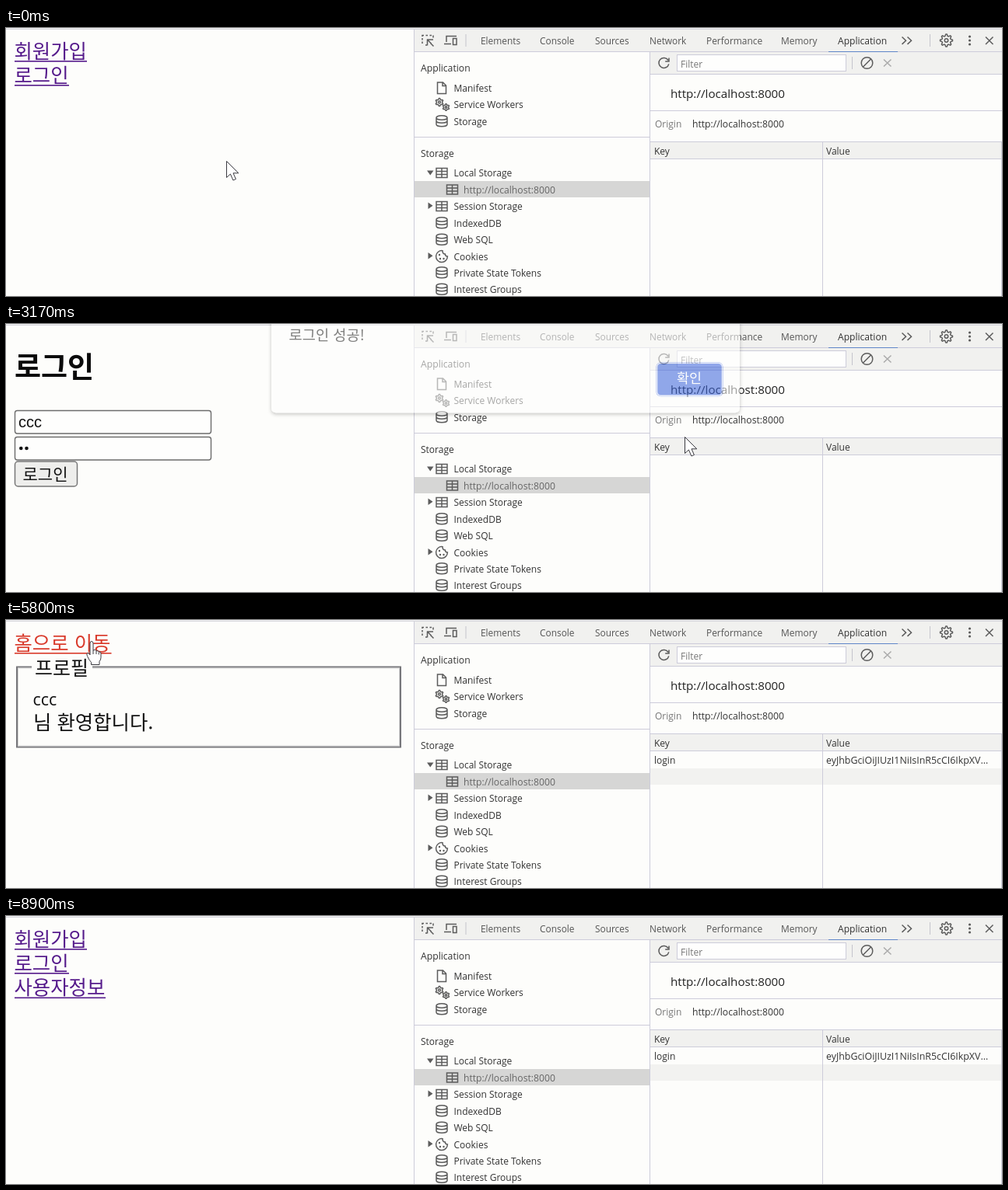
An HTML page that plays this animation: 1280x345 px, repeating every 8930 ms.

```html
<!DOCTYPE html>
<html lang="ko">
<head>
<meta charset="utf-8">
<title>Login demo</title>
<style>
  html, body { margin: 0; width: 100%; height: 100%; overflow: hidden; background: #fdfdfb; }
  svg { display: block; width: 1280px; height: 345px; }
  text { white-space: pre; }
  .ui { font-family: "Open Sans", "Noto Sans", sans-serif; }
  .ko { font-family: "Noto Sans CJK KR", "Noto Sans CJK", "Noto Sans KR", sans-serif; }
  .field { font-family: "Liberation Sans", sans-serif; }
  .icon { fill: none; stroke: #5c5c5c; stroke-width: 1.5; }
</style>
</head>
<body>
<svg id="stage" viewBox="0 0 1280 345" xmlns="http://www.w3.org/2000/svg"></svg>
<script>
const LOOP = 8930;
const INK = '#333', GREY = '#5c5c5c', LINE = '#cdccda', BAR = '#f1f1ef', PAPER = '#fdfdfb';
const VISITED = '#551a8b', ACTIVE = '#d93a2b', BLUE = '#3f67dc';
const stage = document.getElementById('stage');

// Markup helpers
const rect = (x, y, w, h, fill, extra = '') =>
  `<rect x="${x}" y="${y}" width="${w}" height="${h}" fill="${fill}" ${extra}/>`;
const text = (x, y, str, size = 12, fill = INK, cls = 'ui', extra = '') =>
  `<text x="${x}" y="${y}" class="${cls}" font-size="${size}" fill="${fill}" ${extra}>${str}</text>`;
const ko = (x, y, str, size = 25.4, fill = '#111', extra = 'font-weight="300"') =>
  text(x, y, str, size, fill, 'ko', extra);
const icon = (d, extra = '') => `<path class="icon" d="${d}" ${extra}/>`;
const group = (id, body, extra = '') => `<g id="${id}" ${extra}>${body}</g>`;
const hline = (x, y, w) => rect(x, y, w, 1, LINE);
const vline = (x, y, h) => rect(x, y, 1, h, LINE);

const gear = (cx, cy, r, teeth) => {
  let d = '';
  for (let i = 0; i < teeth * 4; i++) {
    const a = (i - .5) / (teeth * 4) * Math.PI * 2;
    const q = i % 4 < 2 ? r : r * .72;
    d += (i ? 'L' : 'M') + (cx + q * Math.sin(a)).toFixed(2) + ' ' + (cy - q * Math.cos(a)).toFixed(2);
  }
  return icon(d + 'Z', 'stroke-linejoin="round"') +
    `<circle cx="${cx}" cy="${cy}" r="${r * .28}" class="icon"/>`;
};
const database = (x, y) =>
  icon(`M${x - 7} ${y - 4.5}a7 2.8 0 0 1 14 0a7 2.8 0 0 1 -14 0v8.4a7 2.8 0 0 0 14 0v-8.4M${x - 7} ${y - .5}a7 2.8 0 0 0 14 0`);
const grid = (x, y) =>
  icon(`M${x - 7} ${y - 6}h14v12h-14zM${x - 7} ${y - 2}h14M${x - 7} ${y + 2}h14M${x} ${y - 6}v12`);
const cookie = (x, y) =>
  icon(`M${x + 1} ${y - 7.3}a7.4 7.4 0 1 0 6.4 7.3q-3 0 -3 -3q-3.4 0 -3.4 -4.3z`) +
  [[-3, -2], [-2, 3], [2.5, 3]].map(([a, b]) => `<circle cx="${x + a}" cy="${y + b}" r="1.2" fill="${GREY}"/>`).join('');
const file = (x, y) => icon(`M${x - 5.5} ${y - 7}h7l4 4v10.5h-11zM${x + 1} ${y - 7}v4.5h4.5`);
const workers = (x, y) => gear(x - 3, y - 3, 5, 6) + gear(x + 5.5, y + 3.5, 4.3, 6);
const twisty = (y, open) => open
  ? `<path d="M541 ${y - 3}h8.500l-4.250 6z" fill="${GREY}"/>`
  : `<path d="M542.500 ${y - 5}v8.500l6 -4.250z" fill="${GREY}"/>`;

function devtools() {
  const url = 'http://localhost:8000';
  const tabs = [[610, 'Elements'], [686, 'Console'], [757, 'Sources'], [827, 'Network'],
    [900, 'Performance'], [996, 'Memory']];
  const rows = [[77, 'Manifest', file], [98.5, 'Service Workers', workers], [120, 'Storage', database],
    [186.5, 'Local Storage', grid], [229.5, 'Session Storage', grid], [251, 'IndexedDB', database],
    [272.5, 'Web SQL', database], [294, 'Cookies', cookie], [315, 'Private State Tokens', database],
    [336.5, 'Interest Groups', database]];
  return rect(524, 2, 756, 343, PAPER) + rect(524, 2, 756, 28, BAR) + hline(524, 30, 756) +
    // tab strip
    icon('M541 22h-2M535 20v-2.500M535 15.500v-2.500M535 11v-1.500h2M539.500 9.500h2.500M544.500 9.500h2.500M549 9.500v3') +
    icon('M549.500 23.500l-4 -4M541 15h8M541.500 14.500v8M541.500 15l5 5') +
    icon('M566 18v-7.500h13M563 20.500h9M574.500 13.500h4.500v8h-4.500z') +
    rect(590.5, 8, 1, 16, '#c4c4cc') +
    tabs.map(([x, s]) => text(x, 20.5, s, 11.9, '#555')).join('') +
    text(1069, 20.5, 'Application', 12.1) + rect(1057, 30, 89, 1.2, '#5f86c8') +
    icon('M1151.500 11.500l5 4.700l-5 4.700M1158.500 11.500l5 4.700l-5 4.700') +
    rect(1187, 8, 1, 16, '#c4c4cc') + gear(1208.5, 16, 8, 8) +
    [11, 16, 21].map(y => `<circle cx="1238.500" cy="${y}" r="1.600" fill="${GREY}"/>`).join('') +
    icon('M1259 11.500l9.500 9.500M1268.500 11.500l-9.500 9.500') +
    // sidebar
    text(533, 55.5, 'Application', 12.2) + hline(524, 140, 303) + text(533, 165.5, 'Storage') +
    rect(524, 197, 303, 21, '#d6d6d5') + grid(573.5, 208) + text(588, 212.5, url, 12.2, '#666') +
    rows.map(([y, s, paint]) => paint(560, y) + text(575.5, y + 4.5, s)).join('') +
    twisty(186.5, true) + twisty(229.5, false) + twisty(294, false) +
    // main view
    rect(828, 31, 452, 28, BAR) + hline(828, 59, 452) +
    icon('M851 41.500a6.500 6.500 0 1 0 .8 4.800M852 38.500v4.500h-4.800') +
    rect(862.5, 34.5, 217, 21, '#fefefd', `stroke="${LINE}"`) + text(867, 50.5, 'Filter', 12, '#777') +
    rect(1087, 37, 1, 16, '#c4c4cc') +
    icon('M1113.800 45a7.300 7.300 0 1 0 -14.600 0a7.300 7.300 0 1 0 14.600 0M1111.500 40l-10 10') +
    icon('M1128 40.500l9.500 9M1137.500 40.500l-9.500 9', 'style="stroke:#aaa"') +
    text(854, 89.5, url, 15.2, '#222') + hline(828, 106, 452) +
    text(834, 127.5, 'Origin', 12, '#777') + text(882, 127.5, url, 12.2) +
    rect(828, 147, 452, 21, BAR) + hline(828, 146, 452) + hline(828, 168, 452) +
    text(833, 162.5, 'Key') + text(1054, 162.5, 'Value') +
    group('entry', rect(828, 191, 452, 21, '#f2f2f0') + text(833, 185, 'login') +
      text(1054, 185, 'eyJhbGciOiJIUzI1NiIsInR5cCI6IkpXV…', 12.4)) +
    vline(1049, 146, 199) + vline(827, 31, 314) + vline(524, 2, 343) + vline(1279, 146, 199);
}

const link = (id, y, str, w) =>
  group(id, ko(10.5, y, str, 25.4, 'currentColor') + rect(11, y + 3.5, w, 1.6, 'currentColor'));

const home = () => link('join', 38.5, '회원가입', 93) + link('signin', 69.5, '로그인', 70) +
  link('info', 101, '사용자정보', 117);

function login() {
  const box = (id, y) => rect(11.5, y, 252, 29.5, '#fefefd', `id="${id}" rx="3"`);
  const items = ['ccc', 'cnrcnr', 'cnrcn', 'cc'];
  return ko(11, 69, '로그인', 37, '#0b0b0b', 'font-weight="700"') +
    box('userBox', 111.5) + box('passBox', 145.5) +
    ko(16.5, 133, '아이디', 20.9, '#757575', 'id="userHint" font-weight="300"') +
    ko(16.5, 167, '비밀번호', 20.9, '#757575', 'id="passHint" font-weight="300"') +
    text(16, 133, '', 20, '#111', 'field', 'id="user"') +
    rect(0, 116, 1.4, 20, '#111', 'id="caret"') +
    [0, 1].map(i => `<circle id="dot${i}" cx="${19.3 + i * 7.2}" cy="160" r="2.300" fill="#111"/>`).join('') +
    rect(11.5, 177, 80, 32, '#eeeeec', 'rx="4" stroke="#777" stroke-width="1.500"') +
    ko(21.5, 200.5, '로그인', 21) +
    group('suggest',
      `<path d="M112 154h16l10 -9.500l10 9.500h167q4 0 4 4v200h-210v-201q0 -3 3 -3z" fill="#fefefd" filter="url(#soft)"/>` +
      items.map((s, i) => text(126, 189.5 + i * 48, s, 16.2, '#2a2a2a')).join(''));
}

const profile = () => link('back', 38.5, '홈으로 이동', 124.5) +
  rect(14, 60.5, 493, 103, 'none', 'stroke="#77777b" stroke-width="2"') +
  rect(15.5, 62, 490, 100, 'none', 'stroke="#d2d2d2" stroke-width="1"') +
  rect(33, 57, 78, 8, PAPER) + ko(37, 70.5, '프로필', 25) +
  text(34.5, 110, 'ccc', 21.5, '#111') + ko(35, 141, '님 환영합니다.');

const dialog = () =>
  rect(341, -60, 602, 176, '#fefefd', 'rx="6" filter="url(#shade)"') +
  ko(363.5, 22.5, '로그인 성공!', 18.7, '#222', '') +
  rect(835.5, 51, 86, 44, BLUE, 'rx="6"') +
  rect(836.5, 52, 84, 42, 'none', 'id="ring" rx="5" stroke="#dfe6fb" stroke-width="1.500"') +
  ko(862, 77.5, '확인', 17.4, '#fff', 'font-weight="500"');

stage.innerHTML = `<defs>
  <filter id="soft" x="-10%" y="-10%" width="120%" height="120%"><feDropShadow dx="0" dy="1" stdDeviation="2" flood-opacity=".28"/></filter>
  <filter id="shade" x="-5%" y="-10%" width="110%" height="125%"><feDropShadow dx="0" dy="2" stdDeviation="2.500" flood-opacity=".4"/></filter>
  </defs>` + rect(0, 0, 1280, 345, PAPER) +
  group('home', home()) + group('login', login()) + group('profile', profile()) +
  rect(0, 0, 1280, 1, '#f4f4f5') + rect(0, 1, 1280, 1, '#d4d4da') +
  devtools() + group('dialog', dialog()) +
  group('pointer',
    group('arrow', '<path d="M.5 .5v21l4.900 -4.500l3.500 8l3.500 -1.500l-3.400 -7.700h6.800z"/>') +
    group('hand', '<path d="M-2 2q0 -2.500 2 -2.500t2 2.500v9q3 -1.800 4 .8q2.500 -1 3.200 1.200q2.800 -.6 2.800 2.200v5q0 3 -2 5.300v4h-10.500v-3q-2.500 -2.500 -5 -8q-1.500 -3 .2 -4q1.700 -.6 3.300 2.500zM2 11v5M6 12v4M9.200 13.500v3"/>') +
    group('beam', '<path d="M-4.500 -11h3.500l1 1l1 -1h3.500M0 -10v20M-4.500 11h3.500l1 -1l1 1h3.500" fill="none" stroke-width="1.700"/>'),
    'fill="#fff" stroke="#3a3a40" stroke-width="1" stroke-linejoin="round"');

const el = {};
stage.querySelectorAll('[id]').forEach(n => el[n.id] = n);
const show = (id, on) => el[id].style.display = on ? '' : 'none';
const clamp = v => Math.max(0, Math.min(1, v));

// Pointer stops: time, x, y
const path = [[0, 283, 171], [200, 283, 171], [800, 52, 60], [1050, 52, 60], [1400, 73, 128],
  [1650, 73, 128], [1850, 73, 152.5], [2700, 73, 152.5], [3170, 872, 145], [3400, 880, 72],
  [3740, 880, 72], [3870, 716, 161], [4450, 70, 92], [4750, 70, 92], [5400, 110, 28],
  [5950, 110, 28], [6350, 75, 92], [6750, 75, 92], [7400, 183, 20], [7760, 183, 20], [8060, 130, -40]];
const pages = [[0, 'home'], [1000, 'login'], [3850, 'home'], [4660, 'profile'],
  [5890, 'home'], [6620, 'profile'], [8350, 'home']];
const presses = [[890, 1000], [4570, 4660], [5730, 5890], [6530, 6620]];

function pointerAt(t) {
  const i = path.findIndex(p => p[0] > t);
  if (i < 0) return path[path.length - 1].slice(1);
  const [t0, x0, y0] = path[i - 1], [t1, x1, y1] = path[i];
  const u = (t - t0) / (t1 - t0), e = u * u * (3 - 2 * u);
  return [x0 + (x1 - x0) * e, y0 + (y1 - y0) * e];
}

function linkAt(page, x, y, member) {
  if (page === 'profile') return x > 10 && x < 136 && y > 16 && y < 45 ? 'back' : '';
  if (page !== 'home' || x < 10 || y < 14) return '';
  if (y < 45) return x < 104 ? 'join' : '';
  if (y < 76) return x < 81 ? 'signin' : '';
  return member && y < 107 && x < 128 ? 'info' : '';
}

function draw(t) {
  const page = pages.filter(p => p[0] <= t).pop()[1];
  const member = t >= 3830;
  const [x, y] = pointerAt(t);
  const over = linkAt(page, x, y, member);
  const pressed = presses.some(([a, b]) => t >= a && t < b);
  ['home', 'login', 'profile'].forEach(id => show(id, id === page));
  ['join', 'signin', 'info', 'back'].forEach(id =>
    el[id].style.color = pressed && id === over ? ACTIVE : VISITED);
  show('info', member);
  show('entry', member);

  // Form: focus, typing, suggestions
  const typed = [1870, 2000, 2130].filter(k => t >= k).length;
  const dots = [2480, 2620].filter(k => t >= k).length;
  const focus = t < 1500 || t >= 3080 ? '' : t < 2330 ? 'userBox' : 'passBox';
  ['userBox', 'passBox'].forEach(id => {
    el[id].setAttribute('stroke', id === focus ? '#111' : '#6c6c6c');
    el[id].setAttribute('stroke-width', id === focus ? 2.5 : 1.4);
  });
  el.user.textContent = 'c'.repeat(typed);
  show('userHint', !typed);
  show('passHint', !dots);
  show('dot0', dots > 0);
  show('dot1', dots > 1);
  show('suggest', t >= 1890 && t < 2330);
  show('caret', focus);
  el.caret.setAttribute('x', 16 + (focus === 'passBox' ? dots * 7.2 : typed * 10));
  el.caret.setAttribute('y', focus === 'passBox' ? 150 : 116);

  // Alert fades in while dropping, then fades out
  const rise = clamp((t - 3080) / 160), fade = clamp((t - 3825) / 200);
  show('dialog', rise > 0 && fade < 1);
  el.dialog.setAttribute('opacity', rise * (1 - fade));
  el.dialog.setAttribute('transform', `translate(0 ${-4 * (1 - rise)})`);
  show('ring', t < 3680);

  const inField = page === 'login' && x > 11 && x < 264 && ((y > 111 && y < 141) || (y > 145 && y < 175));
  show('hand', over);
  show('beam', !over && inField);
  show('arrow', !over && !inField);
  el.pointer.setAttribute('transform', `translate(${x.toFixed(1)} ${y.toFixed(1)})`);
}

function tick() {
  draw(performance.now() % LOOP);
  requestAnimationFrame(tick);
}
tick();
</script>
</body>
</html>
```
